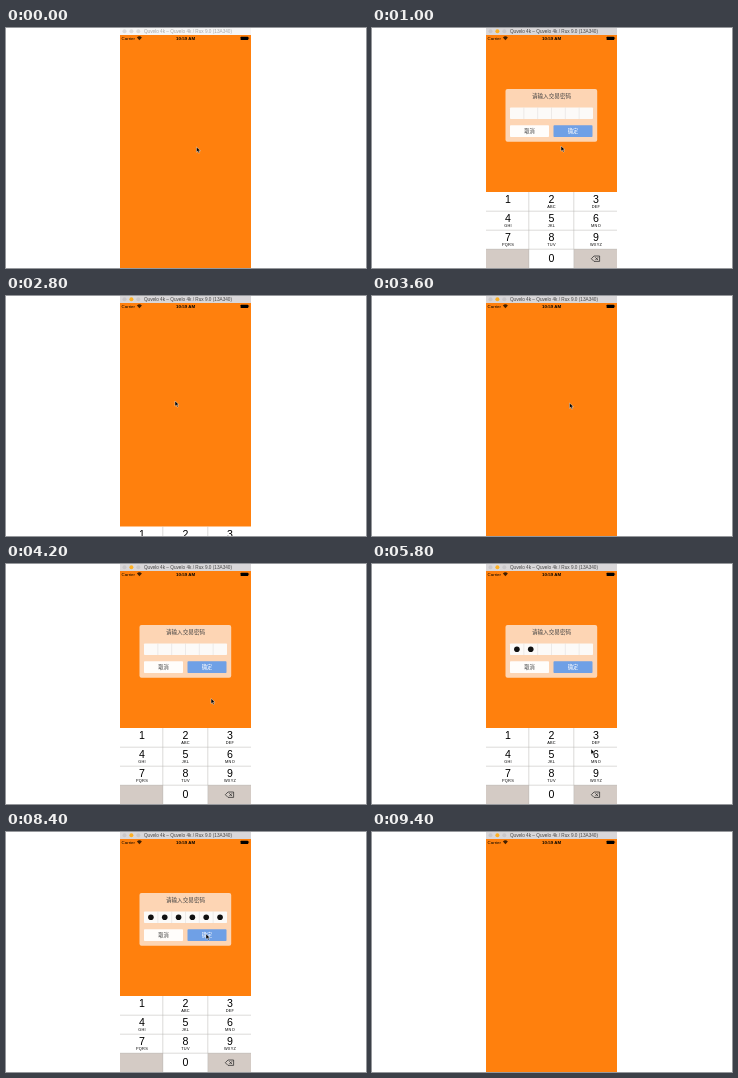
These frames come from a looping animation (360x240 px, 9600 ms). An HTML page:

```html
<!DOCTYPE html>
<html lang="zh">
<head>
<meta charset="utf-8">
<style>
html, body { margin: 0; width: 100%; height: 100%; overflow: hidden; background: #fff; }
svg { display: block; width: 360px; height: 240px; font-family: "Liberation Sans", Arial, sans-serif; }
text { text-anchor: middle; }
.cjk { font-family: "Noto Sans CJK SC", "Noto Sans CJK", sans-serif; }
.digit { font-size: 10.6px; }
.letters { font-size: 3.9px; letter-spacing: .25px; }
</style>
</head>
<body>
<svg viewBox="0 0 360 240">
  <rect x="114" width="131" height="240" fill="#ff800d"/>
  <rect id="bar" x="114" width="131" height="7"/>
  <g id="lights"></g>
  <text id="title" x="182" y="4.9" font-size="4.7">Quvelo 4k – Quvelo 4k / Rux 9.0 (13A340)</text>

  <text x="122.3" y="12" font-size="4.4">Carrier</text>
  <path d="M130.9 9.4Q133.4 7.3 135.9 9.4L133.4 12.2Z" fill="#421f00"/>
  <text x="179.5" y="12" font-size="4.4" font-weight="bold">10:59 AM</text>
  <rect x="234.6" y="8.7" width="7.6" height="3.3" rx=".6"/>
  <rect x="242.5" y="9.6" width=".6" height="1.5"/>

  <g id="dialog">
    <rect x="133.5" y="61" width="91.7" height="52.7" rx="2" fill="#fdd5b4"/>
    <text class="cjk" x="179.5" y="69.6" font-size="5.6" fill="#444">请输入交易密码</text>
    <rect x="138" y="79.5" width="83" height="11.6" rx=".8" fill="#fcfaf8"/>
    <g id="cells"></g>
    <rect x="138" y="97.2" width="39" height="11.8" rx=".8" fill="#fffdfb"/>
    <text class="cjk" x="157.5" y="105.1" font-size="5.3" fill="#444">取消</text>
    <rect x="181.5" y="97.2" width="39" height="11.8" rx=".8" fill="#6fa0e6"/>
    <text class="cjk" x="201" y="105.1" font-size="5.3" fill="#fff">确定</text>
  </g>

  <g id="keyboard">
    <rect x="114" y="164" width="131" height="76" fill="#fff"/>
    <path d="M114 221h43v19h-43zM202 221h43v19h-43z" fill="#d4cbc5"/>
    <rect id="pressed" x="202" y="183" width="43" height="19" fill="#d4cbc5"/>
    <path d="M114 183.2h131M114 202.2h131M114 221.2h131M156.8 164v76M201.8 164v76" stroke="#b9b5b2" stroke-width=".5"/>
    <g id="keys"></g>
    <path d="M219.3 230.7l2.7-2.7h5.6v5.4h-5.6zM223.3 229.3l2.8 2.8m0-2.8l-2.8 2.8" fill="none" stroke="#222" stroke-width=".7"/>
  </g>

  <path id="cursor" d="M0 0V5.2L1.3 4.1 2.2 6.1 3.2 5.7 2.3 3.7H4Z" stroke="#fff" stroke-width=".4"/>
</svg>
<script>
const LOOP = 9600, STEP = 200;
const $ = id => document.getElementById(id);
const show = (id, on) => $(id).style.display = on ? '' : 'none';
const clamp = v => Math.max(0, Math.min(1, v));

const openings = [[400, 2600], [3800, 8600]];
const presses = [5000, 5500, 6200, 6600, 7100, 7500];
// time, x, y of the pointer tip
const route = [
  [0, 190.5, 119], [400, 190.5, 119], [1000, 189, 118], [1400, 189, 118],
  [2200, 169, 105], [2800, 169, 105], [3400, 197.5, 107], [3800, 197.5, 107],
  [4800, 219, 185], [5800, 219, 185], [6400, 212, 194], [7600, 212, 194],
  [8200, 200, 102], [8800, 200, 102], [9200, 240, 60]
];

$('lights').innerHTML = [118.5, 125.4, 132.3].map(x => `<circle cx="${x}" cy="3.2" r="2"/>`).join('');
const lights = [...$('lights').children];

let cells = '';
for (let i = 0; i < 6; i++) {
  const x = 138 + i * 13.83;
  if (i) cells += `<path d="M${x} 79.5v11.6" stroke="#dedbd8" stroke-width=".5"/>`;
  cells += `<circle class="dot" cx="${x + 6.9}" cy="85.3" r="2.8" fill="#111"/>`;
}
$('cells').innerHTML = cells;
const dots = [...document.querySelectorAll('.dot')];

const letters = ['', 'ABC', 'DEF', 'GHI', 'JKL', 'MNO', 'PQRS', 'TUV', 'WXYZ'];
const key = (digit, x, y, sub) =>
  `<text class="digit" x="${x}" y="${y}">${digit}</text><text class="letters" x="${x}" y="${y + 5}">${sub}</text>`;
$('keys').innerHTML = letters.map((sub, i) =>
  key(i + 1, [136, 179.5, 224][i % 3], 175.2 + 19 * Math.floor(i / 3), sub)).join('') + key(0, 179.5, 234.4, '');

function pointer(t) {
  const i = Math.max(1, route.findIndex(p => p[0] >= t));
  const [t0, x0, y0] = route[i - 1], [t1, x1, y1] = route[i];
  const k = clamp((t - t0) / (t1 - t0)), e = k * k * (3 - 2 * k);
  return [x0 + (x1 - x0) * e, y0 + (y1 - y0) * e];
}

function draw(t) {
  const active = t >= 400;
  $('bar').setAttribute('fill', active ? '#d9d7d9' : '#f5f5f5');
  $('title').setAttribute('fill', active ? '#444' : '#aaa');
  lights.forEach((c, i) => c.setAttribute('fill', active ? ['#c9c7c9', '#fdb024', '#c9c7c9'][i] : '#dcdcdc'));

  let rise = 0, fade = 0;
  for (const [start, end] of openings) {
    const opened = clamp((t - start) / 400), closed = clamp((t - end) / 400);
    rise += 1 - (1 - opened) ** 3 - (1 - (1 - closed) ** 3);
    fade += clamp((t - start) / 200) - clamp((t - end) / 200);
  }
  $('keyboard').setAttribute('transform', `translate(0 ${76 * (1 - rise)})`);
  show('keyboard', rise > 0);
  $('dialog').setAttribute('opacity', fade);

  dots.forEach((dot, i) => dot.style.display = t >= presses[i] ? '' : 'none');
  show('pressed', presses.some(p => t >= p && t < p + STEP));

  show('cursor', t < 9200);
  if (t < 9200) $('cursor').setAttribute('transform', `translate(${pointer(t)})`);
}

const begin = performance.now();
function tick() {
  const t = (performance.now() - begin) % LOOP;
  draw(Math.floor(t / STEP) * STEP);
  requestAnimationFrame(tick);
}
tick();
</script>
</body>
</html>
```
